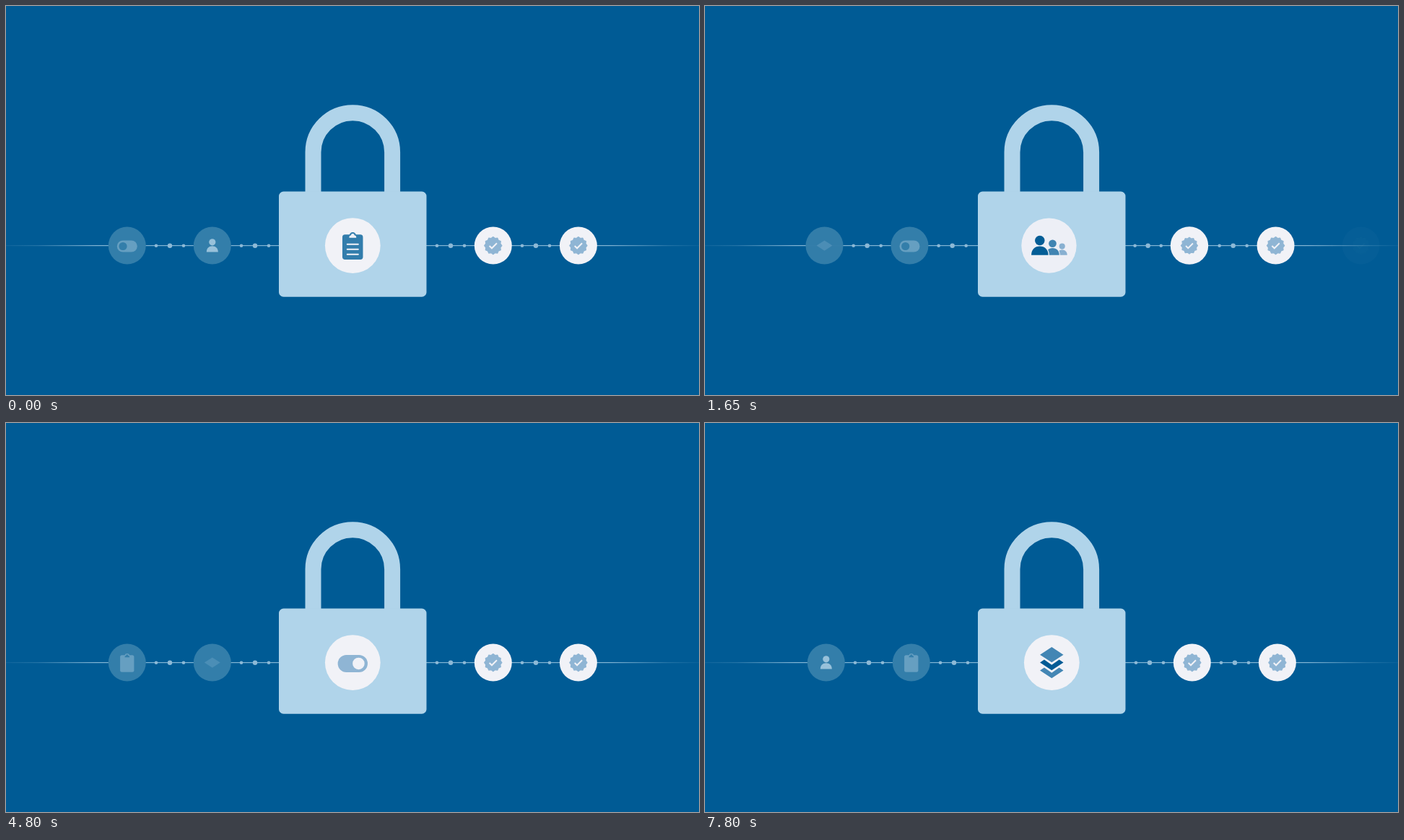
Write an HTML page with a canvas that moves like this. It is 960 px wide and 540 px high and loops after 8000 ms.

```html
<!DOCTYPE html>
<html lang="en">
<head>
<meta charset="utf-8">
<title>Padlock chain</title>
<style>
html, body { margin: 0; width: 100%; height: 100%; overflow: hidden; background: #005b95; }
canvas { display: block; width: 960px; height: 540px; }
</style>
</head>
<body>
<canvas id="stage" width="960" height="540"></canvas>
<script>
const ctx = document.getElementById('stage').getContext('2d');
const LOOP = 8000, PHASE = 3000, MOVE = 1800, STEP = 50;
const Y = 332.6, SMALL = 26, BIG = 38.4;
const SLOTS = [49.7, 167.8, 285.8, 480.3, 674.8, 792.9, 911];
const ORDER = ['clipboard', 'user', 'toggle', 'layers'];

const NAVY = [0, 91, 149], WHITE = [241, 242, 247], ICE = [176, 212, 234];
const MUTED = [51, 126, 170], TINT = [102, 161, 192], PALE = [143, 181, 212];
const SOFT = [102, 159, 193], STEEL = [67, 134, 180], DIM = [75, 142, 182];
const FACE = [152, 193, 218], DEEP = [50, 125, 172], MID = [93, 152, 190];

const clamp = v => Math.max(0, Math.min(1, v));
const ramp = (v, a, b) => clamp((v - a) / (b - a));
const lerp = (a, b, p) => a + (b - a) * p;
const mix = (a, b, p) => a.map((v, i) => lerp(v, b[i], p));
const css = (c, a = 1) => `rgba(${c.map(Math.round).join(',')},${a})`;

function fill(c) {
  ctx.fillStyle = css(c);
  ctx.fill();
}

function disc(x, y, r, c) {
  ctx.beginPath();
  ctx.arc(x, y, r, 0, Math.PI * 2);
  fill(c);
}

function box(x, y, w, h, r, c) {
  ctx.beginPath();
  ctx.roundRect(x, y, w, h, r);
  fill(c);
}

function poly(points, c) {
  ctx.beginPath();
  points.forEach(([x, y]) => ctx.lineTo(x, y));
  ctx.closePath();
  fill(c);
}

function at(x, y, scale, alpha, draw) {
  if (scale <= 0 || alpha <= 0) return;
  ctx.save();
  ctx.translate(x, y);
  ctx.scale(scale, scale);
  ctx.globalAlpha *= alpha;
  draw();
  ctx.restore();
}

// Icons are drawn around (0, 0) for a circle of radius 26.
// p: 0 small to 1 large; open: how far the details have unfolded.
function person(x, scale, c, gap) {
  const torso = new Path2D('M-8 9C-8 3.6-4.6.6 0 .6S8 3.6 8 9Z');
  at(x, 9 - 9 * scale, scale, 1, () => {
    if (gap) {
      ctx.strokeStyle = css(gap);
      ctx.lineWidth = 1.8;
      ctx.stroke(torso);
    }
    ctx.fillStyle = css(c);
    ctx.fill(torso);
    disc(0, -4.8, 4.6, c);
  });
}

const icons = {
  user(p, open, back, c = mix(FACE, NAVY, p)) {
    if (open > 0) {
      person(13.1 * open, lerp(1, .58, open), mix(c, PALE, open));
      person(3.6 * open, lerp(1, .78, open), mix(c, STEEL, open), back);
    }
    person(-9.1 * open, 1, c, open > 0 && back);
  },

  toggle(p, open, back) {
    const c = p < .5 ? mix(SOFT, MID, p * 2) : mix(MID, PALE, p * 2 - 1);
    box(-14, -7.2, 28, 16.2, 8.1, c);
    disc(lerp(-5.8, 5.5, open), .9, 5.6, back);
  },

  layers(p, open) {
    const c = mix(DIM, STEEL, p), d = 7.4 * open;
    const chevron = (dy, color) => poly([[-11, 0], [-7, -2.7], [0, 2.2], [7, -2.7], [11, 0], [0, 7.2]]
      .map(([x, y]) => [x, y + dy]), color);
    if (open > 0) {
      chevron(d, c);
      chevron(0, mix(c, NAVY, open));
    }
    poly([[-11, -d], [0, -7.2 - d], [11, -d], [0, 7.2 - d]], c);
  },

  clipboard(p, open, back) {
    const c = mix(SOFT, DEEP, p);
    box(-9.7, -10.4, 19.3, 23.5, 2.5, c);
    disc(0, -9.4, 3.2, c);
    ctx.fillStyle = css(back);
    ctx.fill(new Path2D('M-3.3-7.3V-8.2Q-3.3-9.6-1.6-9.7A1.6 1.6 0 0 1 1.6-9.7Q3.3-9.6 3.3-8.2V-7.3Z'));
    if (open > 0) for (const y of [-1.2, 3.5, 8.2]) box(-5.8, y - .7, 11.6 * open, 1.4, .7, back);
  }
};

function badge() {
  ctx.beginPath();
  for (let i = 0; i < 24; i++) {
    const r = i % 2 ? 10.4 : 12.1, a = i * Math.PI / 12;
    ctx.lineTo(r * Math.sin(a), -r * Math.cos(a));
  }
  ctx.closePath();
  ctx.lineJoin = 'round';
  ctx.lineWidth = 1.2;
  ctx.strokeStyle = css(PALE);
  ctx.stroke();
  fill(PALE);
  ctx.beginPath();
  ctx.moveTo(-5.2, .4);
  ctx.lineTo(-1.8, 3.7);
  ctx.lineTo(5.2, -3.3);
  ctx.lineWidth = 2;
  ctx.lineJoin = 'miter';
  ctx.strokeStyle = css(WHITE);
  ctx.stroke();
}

function dots(x, gap, alpha) {
  ctx.globalAlpha = alpha;
  [-1, 0, 1].forEach(i => disc(x + i * gap, Y + .1, i ? 2.3 : 3.2, [141, 185, 214]));
  ctx.globalAlpha = 1;
}

function chain(p) {
  const g = ctx.createLinearGradient(0, 0, 960, 0);
  [[0, .08], [.045, .2], [.13, .75], [.87, .75], [.955, .2], [1, .05]]
    .forEach(([stop, a]) => g.addColorStop(stop, css(ICE, a)));
  ctx.fillStyle = g;
  ctx.fillRect(0, Y - .6, 960, 1.2);

  const shift = 118 * p, gap = q => 19 * clamp(1 - 2.5 * q);
  dots(109 + shift, 19, p);
  dots(227 + shift, 19, 1);
  dots(345 + shift, gap(p), 1);
  dots(616 - 118 + shift, gap(1 - p), 1);
  dots(616 + shift, 19, 1);
  dots(734 + shift, 19, 1 - p);
}

function padlock() {
  ctx.beginPath();
  ctx.moveTo(425.5, 262);
  ctx.lineTo(425.5, 203);
  ctx.arc(480.3, 203, 54.8, Math.PI, 0);
  ctx.lineTo(535.1, 262);
  ctx.lineWidth = 22;
  ctx.strokeStyle = css(ICE);
  ctx.stroke();
  box(378, 257.5, 204.5, 146.2, 6.5, ICE);
}

function waiting(name, x, alpha) {
  at(x, Y, 1, alpha, () => {
    disc(0, 0, SMALL, MUTED);
    icons[name](0, 0, MUTED);
  });
}

function verified(x, alpha) {
  // blend toward the background so the icon fades with its disc
  at(x, Y, 1, alpha, () => {
    disc(0, 0, SMALL, WHITE);
    badge();
  });
}

function arriving(name, x, p) {
  const r = lerp(SMALL, BIG, p);
  at(x, Y, 1, lerp(.5, 1, p), () => disc(0, 0, r, mix(TINT, WHITE, p)));
  at(x, Y, r / SMALL, 1, () => icons[name](p, ramp(p, .62, 1), mix(MUTED, WHITE, p)));
}

function leaving(name, x, p) {
  const r = lerp(BIG, SMALL, p), k = r / SMALL;
  disc(x, Y, r, WHITE);
  if (name === 'user') {
    const tone = mix(NAVY, PALE, ramp(p, 0, .45));
    at(x, Y, k, 1 - ramp(p, .36, .7), () => icons.user(1, 1 - ramp(p, 0, .42), WHITE, tone));
  } else {
    const rate = name === 'toggle' ? 2 : 1.51;
    at(x, Y, k * (1 - rate * p), 1, () => icons[name](1, 1, WHITE));
  }
  at(x, Y, k * ramp(p, .66, 1), 1, badge);
}

function render(time) {
  const t = Math.floor((time + 2) / STEP) * STEP % LOOP;
  const phase = Math.floor(t / PHASE);
  const u = clamp((t - phase * PHASE) / MOVE);
  const p = u * u * (3 - 2 * u);
  const x = i => lerp(SLOTS[i], SLOTS[i + 1], p);
  const item = i => ORDER[(phase + 3 - i) % 4];

  ctx.fillStyle = css(NAVY);
  ctx.fillRect(0, 0, 960, 540);
  chain(p);
  at(x(2), Y, 1, clamp(1 - 2 * p), () => disc(0, 0, lerp(SMALL, BIG, p), NAVY));
  padlock();
  waiting(item(0), x(0), p);
  waiting(item(1), x(1), 1);
  verified(x(5), 1 - p);
  verified(x(4), 1);
  if (p < 1) leaving(item(3), x(3), p);
  else verified(SLOTS[4], 1);
  arriving(item(2), x(2), p);
}

function tick() {
  render(performance.now());
  requestAnimationFrame(tick);
}
tick();
</script>
</body>
</html>
```
